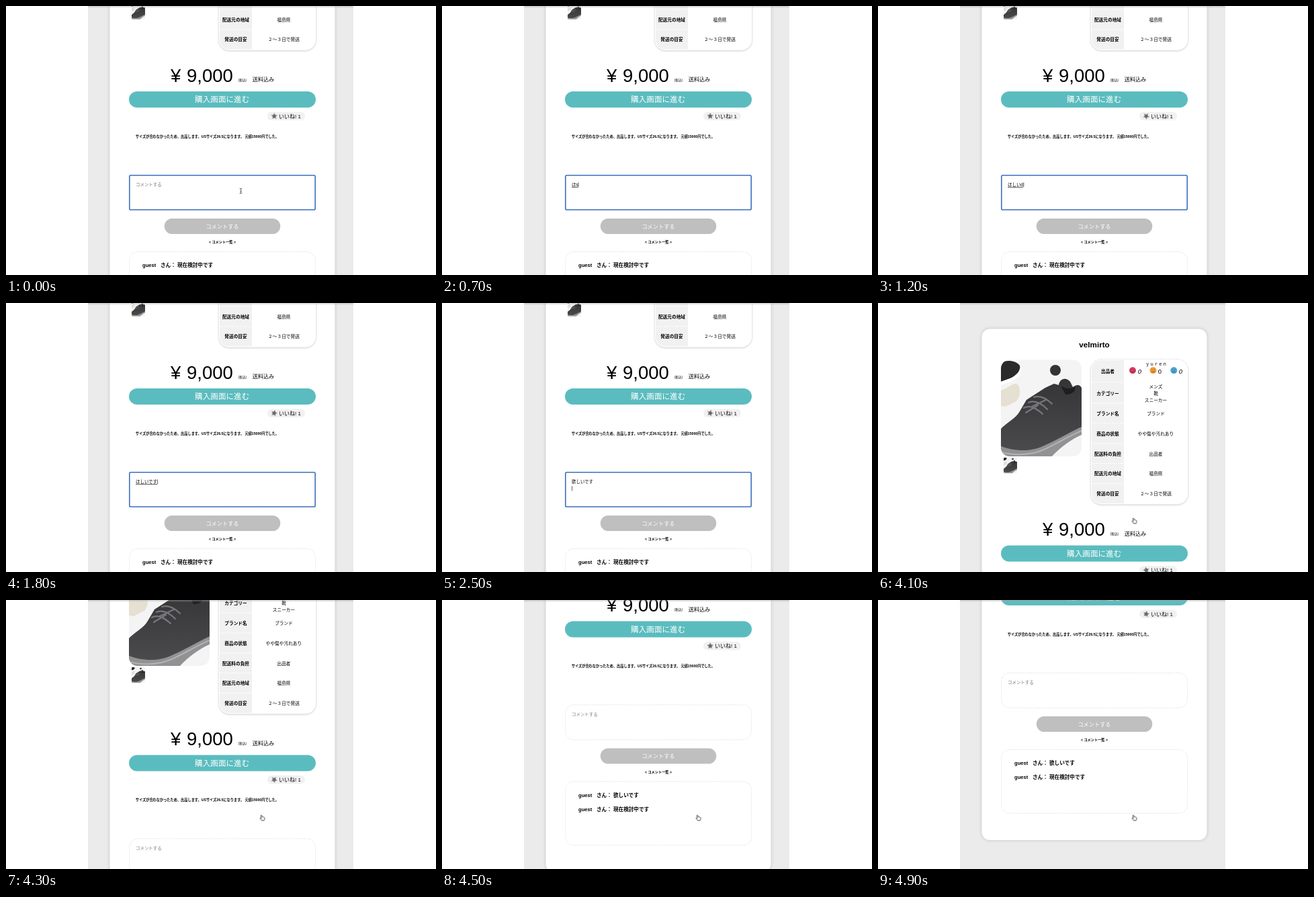
Recreate the animation shown at these times as an HTML page. Size 640 by 400 pixels, loop 5 s.

```html
<!DOCTYPE html>
<html lang="ja">
<head>
<meta charset="utf-8">
<title>コメント投稿</title>
<style>
  html, body { margin: 0; width: 100%; height: 100%; overflow: hidden; background: #fff; }
  svg { display: block; width: 640px; height: 400px; }
  text { font: 500 6.7px "Liberation Sans", "Noto Sans CJK JP", "Noto Sans CJK", sans-serif; fill: #000; white-space: pre; }
  .mid text, text.mid { text-anchor: middle; }
  .bold text, text.bold { font-weight: 700; }
  text.white { fill: #fff; font-weight: 400; }
  .dash { fill: #fff; stroke: #dedede; stroke-width: .8; stroke-dasharray: 2.2 1.6; }
  .card { filter: drop-shadow(0 0 2.5px rgba(0, 0, 0, .18)); }
  .table { filter: drop-shadow(0 1px 1px rgba(0, 0, 0, .16)); }
  .typed text { font-size: 6.45px; }
  .ime text { text-decoration: underline; text-decoration-thickness: .6px; text-underline-offset: 1px; }
  .list text { font-size: 7.6px; font-weight: 700; }

  /* 2% of the loop is one 100 ms step */
  .page, .strip, .focus, .old, .new, .status, .mouse, .beam, .hand { animation: 5s step-end infinite; }
  .page { animation-name: scroll; }
  .strip { animation-name: type; }
  .focus { animation-name: focus; }
  .old { animation-name: push; }
  .new { animation-name: post; }
  .status { animation-name: status; }
  .mouse { animation-name: move; }
  .beam { animation-name: beam; }
  .hand { animation-name: hand; }
  .star { animation: spin 5s steps(50) infinite; }

  @keyframes spin { to { transform: rotate(1040deg); } }
  @keyframes scroll {
    0% { transform: translateY(-233.5px); }
    72% { transform: translateY(0); }
    84% { transform: translateY(-28px); }
    86% { transform: translateY(-130px); }
    88% { transform: translateY(-250px); }
    90% { transform: translateY(-329px); }
    92% { transform: translateY(-350px); }
    94% { transform: translateY(-364px); }
    96% { transform: translateY(-372px); }
    98%, 100% { transform: translateY(-376.5px); }
  }
  @keyframes type {
    0% { transform: translateY(0); }
    10% { transform: translateY(-60px); }
    12% { transform: translateY(-120px); }
    14% { transform: translateY(-180px); }
    16% { transform: translateY(-240px); }
    20% { transform: translateY(-300px); }
    24% { transform: translateY(-360px); }
    26% { transform: translateY(-420px); }
    30% { transform: translateY(-480px); }
    32% { transform: translateY(-540px); }
    38% { transform: translateY(-600px); }
    42% { transform: translateY(-660px); }
    46% { transform: translateY(-720px); }
    60% { transform: translateY(-780px); }
    72%, 100% { transform: translateY(0); }
  }
  @keyframes focus { 0% { visibility: visible; } 60%, 100% { visibility: hidden; } }
  @keyframes push { 0% { transform: none; } 72%, 100% { transform: translateY(21px); } }
  @keyframes post { 0% { visibility: hidden; } 72%, 100% { visibility: visible; } }
  @keyframes status {
    0% { visibility: hidden; }
    68% { visibility: visible; }
    76%, 100% { visibility: hidden; }
  }
  @keyframes move {
    0% { transform: translate(349.5px, 275px); }
    54% { transform: translate(352px, 280px); }
    56% { transform: translate(364px, 300px); }
    58% { transform: translate(377px, 320px); }
    60%, 100% { transform: translate(381.5px, 324px); }
  }
  @keyframes beam {
    0% { visibility: visible; }
    10% { visibility: hidden; }
    54% { visibility: visible; }
    58%, 100% { visibility: hidden; }
  }
  @keyframes hand { 0% { visibility: hidden; } 58%, 100% { visibility: visible; } }
</style>
</head>
<body>
<svg viewBox="0 0 640 400">
  <defs>
    <clipPath id="view"><rect x="122" width="395" height="400"/></clipPath>
    <clipPath id="frame"><rect x="183" y="84.5" width="120" height="143.5" rx="13"/></clipPath>
    <clipPath id="cells"><rect x="318" y="85" width="142" height="213" rx="14"/></clipPath>
    <clipPath id="field"><rect x="186" y="487" width="272" height="47"/></clipPath>
    <linearGradient id="edge" x2="0" y2="1">
      <stop stop-color="#999" stop-opacity=".5"/>
      <stop offset="1" stop-color="#bbb" stop-opacity="0"/>
    </linearGradient>
    <linearGradient id="wool" x2="0" y2="1">
      <stop stop-color="#343436"/>
      <stop offset="1" stop-color="#4b4a4c"/>
    </linearGradient>
  </defs>

  <g clip-path="url(#view)">
    <rect x="122" width="395" height="400" fill="#ebebeb"/>

    <g class="page">
      <rect class="card" x="154.5" y="38.5" width="335" height="695" rx="12" fill="#fff"/>
      <text class="mid bold" x="322" y="66" style="font-size:11.7px">velmirto</text>

      <!-- product picture -->
      <g id="photo" clip-path="url(#frame)">
        <rect x="183" y="84" width="120" height="145" fill="#f4f4f4"/>
        <path d="M183 88C194 84 206 86 211 93 213 100 206 108 197 112L183 117Z" fill="#2a2a2b"/>
        <path d="M183 117L197 112C206 108 211 102 212 97 214 106 206 113 198 117L183 122Z" fill="#fff"/>
        <path d="M183 130C192 128 198 120 206 120 213 124 213 138 206 146L190 154 183 153Z" fill="#e5e0d2"/>
        <path d="M183 187C192 177 204 173 211 161L221 144 249 126 262 120 269 122C270 113 279 109 286 117L290 125C296 121 300 121 303 126V190L240 222 183 218Z" fill="url(#wool)"/>
        <path d="M272 123C279 128 288 128 293 124 296 130 288 137 279 136Z" fill="#1e1e20"/>
        <path d="M183 213C201 220 226 222 245 213 266 204 284 193 303 184V196C287 203 270 216 258 229H183Z" fill="#929193"/>
        <path d="M183 222C210 228 232 225 249 217 268 208 286 197 303 190" fill="none" stroke="#b3b2b3" stroke-width="2"/>
        <path d="M217 156C227 151 236 157 245 165M224 148C234 144 244 150 252 158M232 140C241 137 251 142 259 150M220 163L238 152M229 154L250 144" fill="none" stroke="#77767a" stroke-width="2.2" stroke-linecap="round"/>
        <circle cx="264" cy="100" r="8" fill="#333"/>
      </g>
      <use href="#photo" transform="translate(187 229.3) scale(.1667) translate(-183 -84)"/>

      <!-- details -->
      <rect class="dash table" x="316.5" y="83.5" width="145" height="216" rx="16"/>
      <g clip-path="url(#cells)">
        <rect x="318" y="85" width="48" height="213" fill="#f1f1f1"/>
        <path d="M318 118H460M318 149H460M318 179H460M318 209H460M318 238.5H460M318 268.5H460" stroke="#fff" stroke-width="1.2" stroke-dasharray="2 1"/>
      </g>
      <g class="mid bold">
        <text x="342" y="103.5">出品者</text>
        <text x="342" y="136.5">カテゴリー</text>
        <text x="342" y="167">ブランド名</text>
        <text x="342" y="196.5">商品の状態</text>
        <text x="342" y="226.5">配送料の負担</text>
        <text x="342" y="256">配送元の地域</text>
        <text x="342" y="285.7">発送の目安</text>
      </g>
      <g class="mid">
        <text x="414" y="93.3" style="font-size:6.4px">ｙｕｒｅｎ</text>
        <text x="413.5" y="126.5">メンズ</text>
        <text x="413.5" y="136.5">靴</text>
        <text x="413.5" y="146.5">スニーカー</text>
        <text x="413.5" y="167">ブランド</text>
        <text x="413.5" y="196.5">やや傷や汚れあり</text>
        <text x="413.5" y="226.5">出品者</text>
        <text x="413.5" y="256">福島県</text>
        <text x="413.5" y="285.7">２〜３日で発送</text>
        <text x="389.5" y="104.6" style="font-size:9.5px;font-style:italic">0</text>
        <text x="419.5" y="104.6" style="font-size:9.5px">0</text>
        <text x="450.5" y="104.6" style="font-size:9.5px;font-style:italic">0</text>
      </g>
      <circle cx="379" cy="100.3" r="5" fill="#d83a68"/>
      <circle cx="409.5" cy="100.3" r="5" fill="#f39b36"/>
      <circle cx="440.3" cy="100.3" r="5" fill="#4fa6d0"/>
      <g fill="none" stroke="#5b2b35" stroke-width=".8" stroke-linecap="round">
        <path d="M376.3 101C377.5 104 380.5 104 381.7 101M377 98.8H377.6M380.4 98.8H381"/>
        <path d="M407.3 102.2H411.7M407.5 98.8H408.1M410.9 98.8H411.5" stroke="#7a4a16"/>
        <path d="M438 103C439 101.4 441.6 101.4 442.6 103M438.3 99H438.9M441.7 99H442.3" stroke="#23506b"/>
      </g>

      <!-- price and purchase -->
      <text y="346.3" style="font-size:27.5px;font-weight:400"><tspan x="245">¥</tspan><tspan x="269">9,000</tspan></text>
      <text x="345.8" y="345.3" style="font-size:4.6px">(税込)</text>
      <text x="366.8" y="345.6" style="font-size:8.1px">送料込み</text>
      <rect x="183" y="360.5" width="278" height="24" rx="12" fill="#5bbcbf"/>
      <text class="mid white" x="321.7" y="376.9" style="font-size:11.6px">購入画面に進む</text>

      <!-- comment form -->
      <g transform="translate(0 .5)">
        <rect x="389" y="390.5" width="56" height="12.5" rx="6.2" fill="#f1f1f1"/>
        <g transform="translate(399.2 396.8)">
          <path class="star" fill="#666" d="M0-4.8L1.29-1.78 4.57-1.48 2.09.68 2.82 3.88 0 2.2-2.82 3.88-2.09.68-4.57-1.48-1.29-1.78Z"/>
        </g>
        <text x="406" y="399.8" style="font-size:8px">いいね! 1</text>
        <text class="bold" x="192.8" y="428.7" style="font-size:5.2px">サイズが合わなかったため、出品します。USサイズ26.5になります。 元値15000円でした。</text>

        <rect class="dash" x="183.4" y="484.4" width="277.2" height="52" rx="13"/>
        <rect class="focus" x="183.8" y="484.8" width="276.4" height="51.2" rx="1.8" fill="#fff" stroke="#3b70bd" stroke-width="1.6"/>
        <g clip-path="url(#field)">
          <g class="strip">
            <g class="typed" transform="translate(193 501)">
              <text style="fill:#757575">コメントする</text>
              <g class="ime">
                <text y="60">h</text>
                <text y="120">ほ</text>
                <text y="180">ほs</text>
                <text y="240">ほし</text>
                <text y="300">ほしい</text>
                <text y="360">ほしいd</text>
                <text y="420">ほしいで</text>
                <text y="480">ほしいでs</text>
                <text y="540">ほしいです</text>
                <text y="600">欲しいです</text>
              </g>
              <text y="660">欲しいです</text>
              <text y="720">欲しいです</text>
              <text y="780">欲しいです</text>
              <path stroke="#222" stroke-width=".7" d="M4.3 54.3v7M6.8 114.3v7M10 174.3v7M13.2 234.3v7M19.6 294.3v7M23.8 354.3v7M26 414.3v7M29.2 474.3v7M32.6 534.3v7M32.6 594.3v7M32.6 654.3v7M.6 724.3v7"/>
            </g>
          </g>
        </g>
        <rect x="235.8" y="549" width="172.5" height="23" rx="11.5" fill="#bfbfbf"/>
        <text class="mid white" x="322" y="563.5" style="font-size:8.2px">コメントする</text>
        <text class="mid bold" x="322" y="586.4" style="font-size:5.2px">&lt; コメント一覧 &gt;</text>

        <!-- comments -->
        <rect class="dash" x="183.4" y="598.4" width="277.2" height="94.8" rx="13"/>
        <g class="list">
          <text class="new" y="621.4"><tspan x="203">guest</tspan><tspan x="230">さん：</tspan><tspan x="255">欲しいです</tspan></text>
          <text class="old" y="621.4"><tspan x="203">guest</tspan><tspan x="230">さん：</tspan><tspan x="255">現在検討中です</tspan></text>
        </g>
      </g>
    </g>

    <rect x="122" width="395" height="3.5" fill="url(#edge)"/>
    <path class="status" d="M122 389H189Q191 389 191 391V400H122Z" fill="#29292b"/>

    <g class="mouse">
      <path class="beam" d="M-1.6-3.8Q0-3.8 0-2.8 0-3.8 1.6-3.8M0-2.8V2.8M-1.6 3.8Q0 3.8 0 2.8 0 3.8 1.6 3.8M-.8.8H.8" fill="none" stroke="#222" stroke-width=".8"/>
      <path class="hand" d="M-2.3-3.4C-2.1-4.4-.9-4.3-.7-3.4L-.2-1.4C.3-2 1-1.8 1.2-1.2 1.7-1.6 2.3-1.3 2.4-.7 3-.9 3.5-.5 3.5.2 3.6 1.7 3.1 2.6 2.7 3.9H-1C-1.5 2.6-2.7 1.8-3.3.7-3.4-.1-2.4-.3-1.6.6Z" fill="#fff" stroke="#222" stroke-width=".8" stroke-linejoin="round"/>
    </g>
  </g>
</svg>
</body>
</html>
```
